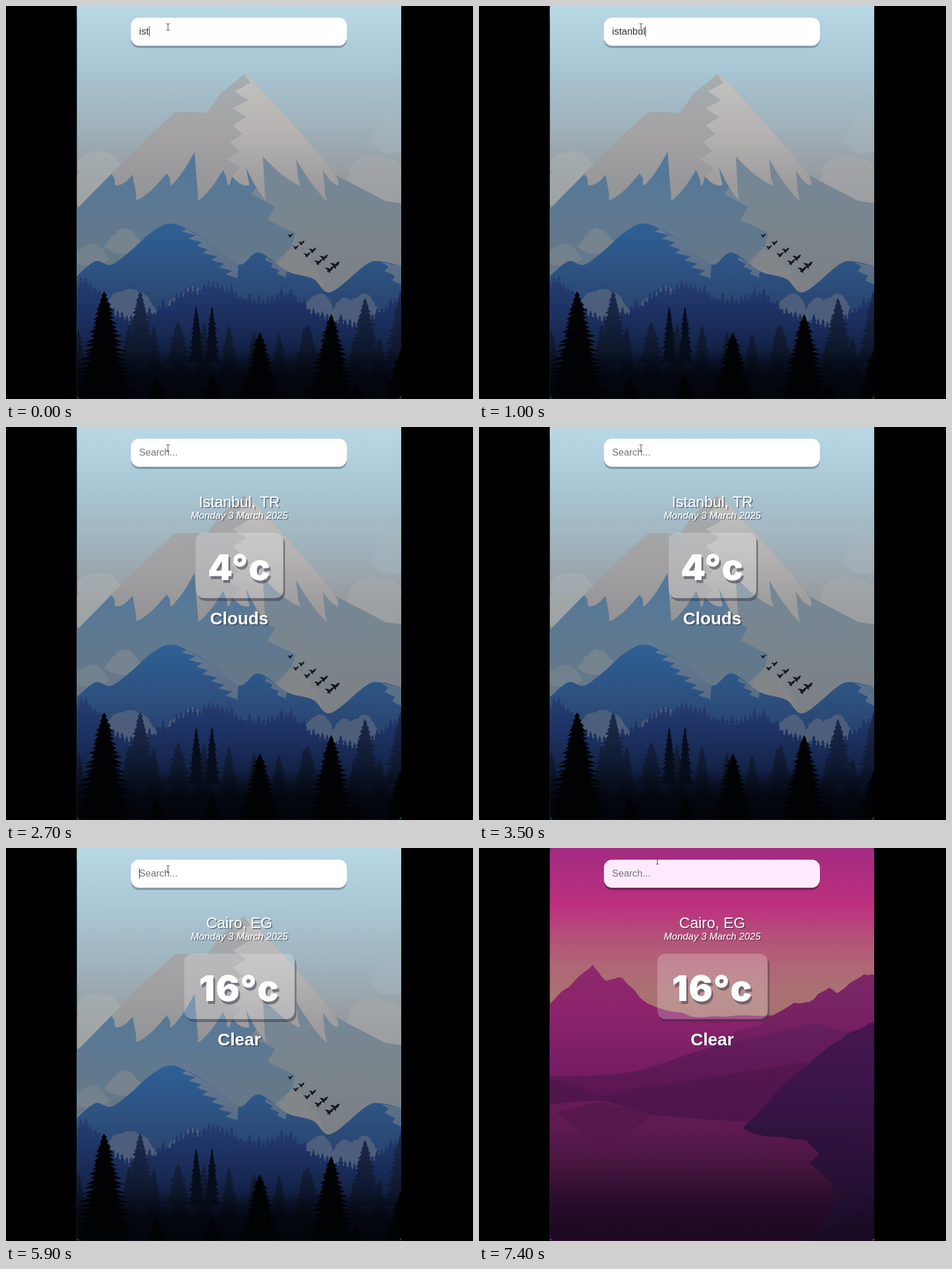
These frames come from a looping animation (800x673 px, 7.5 s). An HTML page:

```html
<!DOCTYPE html>
<html lang="en">
<head>
<meta charset="utf-8">
<title>Weather search</title>
<style>
  html, body { margin: 0; width: 100%; height: 100%; overflow: hidden; background: #000; }
  #stage { position: relative; width: 800px; height: 673px; overflow: hidden; font-family: "Liberation Sans", Arial, sans-serif; }
  #stage > * { position: absolute; }
  svg { left: 0; top: 0; }
  #hot, .warm #cold { display: none; }
  .warm #hot { display: inline; }
  #search {
    left: 214px; top: 20px; width: 370px; height: 48px; border-radius: 14px;
    background: #fff; box-shadow: 0 4px rgba(0, 0, 0, .24);
  }
  .warm #search { background: #feeafc; box-shadow: 0 4px rgba(0, 0, 0, .3); }
  #query { position: absolute; left: 14px; top: 3.2px; font-size: 16.5px; line-height: 40px; color: #313131; white-space: pre; }
  #caret { display: inline-block; width: 1px; height: 17px; margin-right: -1px; vertical-align: -3px; background: #333; }
  #hint { color: #757575; }
  #panel { left: 0; top: 0; width: 799px; height: 673px; color: #fff; text-align: center; }
  #panel div { position: absolute; left: 0; right: 0; line-height: 40px; white-space: pre; }
  #place { top: 108px; font-size: 25.8px; text-shadow: 2px 2px rgba(50, 50, 70, .5); }
  #date { top: 132.2px; font-size: 16.7px; font-style: italic; text-shadow: 2px 2px rgba(50, 50, 70, .5); }
  #panel #box {
    left: 50%; right: auto; top: 181px; height: 112px; transform: translateX(-50%);
    border-radius: 14px; background: rgba(255, 255, 255, .22); box-shadow: 3px 5px rgba(50, 50, 70, .45);
  }
  #temp { top: 219.8px; font: 900 61px Inter, sans-serif; letter-spacing: 1px; text-shadow: 3px 5px rgba(50, 50, 70, .5); }
  #sky { top: 307.8px; font-size: 29.5px; font-weight: 700; text-shadow: 2.4px 2.4px rgba(50, 50, 70, .5); }
  #pointer { left: -4px; top: -7px; }
</style>
</head>
<body>
<div id="stage">
  <svg id="art" width="800" height="673">
    <defs>
      <clipPath id="frame"><rect x="121.5" y="-1" width="555.5" height="673.5" rx="8"/></clipPath>
    </defs>
    <g id="cold">
      <rect x="121.5" width="555.5" height="672" fill="#26495c"/>
      <rect x="121.5" width="555.5" height="20" fill="#dcd6c4"/>
      <g id="peaks" clip-path="url(#frame)"></g>
    </g>
    <g id="hot">
      <rect x="121.5" width="555.5" height="672" fill="#7d3a86"/>
      <g id="lake" clip-path="url(#frame)"></g>
    </g>
  </svg>
  <div id="search"><div id="query"><span id="typed"></span><i id="caret"></i><span id="hint">Search...</span></div></div>
  <div id="panel">
    <div id="place"></div>
    <div id="date">Monday 3 March 2025</div>
    <div id="box"></div>
    <div id="temp"></div>
    <div id="sky"></div>
  </div>
  <svg id="pointer" width="9" height="14">
    <path d="M2 1.5H4L4.5 2 5 1.5H7M4.5 2V12M2 12.5H4L4.5 12 5 12.5H7" fill="none" stroke="#444"/>
  </svg>
</div>
<script>
const $ = id => document.getElementById(id);
let scene, seed = 11, gradients = 0;
const rnd = () => (seed = seed * 16807 % 2147483647) / 2147483647;
const jitter = amp => (rnd() - .5) * 2 * amp;

function add(parent, tag, attrs) {
  const el = document.createElementNS("http://www.w3.org/2000/svg", tag);
  for (const k in attrs) el.setAttribute(k, attrs[k]);
  return parent.appendChild(el);
}

// Point lists
const points = s => s.split(" ").map(p => p.split(",").map(Number));
const mix = (a, b, u) => [a[0] + (b[0] - a[0]) * u, a[1] + (b[1] - a[1]) * u];
const ground = (pts, y = 673) => [...pts, [pts[pts.length - 1][0], y], [pts[0][0], y]];

function rough(pts, amp) {
  return pts.flatMap((p, i) => {
    const next = pts[i + 1];
    if (!next) return [p];
    return [p, ...[.25, .5, .75].map(u => mix(p, next, u).map(v => v + jitter(amp)))];
  });
}

// Catmull-Rom curve through the points.
function smooth(pts) {
  const out = [];
  for (let i = 0; i < pts.length - 1; i++) {
    const a = pts[i - 1] || pts[i], b = pts[i], c = pts[i + 1], d = pts[i + 2] || c;
    for (let u = 0; u < 1; u += .125)
      out.push([0, 1].map(k => b[k] + .5 * u * (c[k] - a[k] + u * (2 * a[k] - 5 * b[k] + 4 * c[k] - d[k]
        + u * (3 * (b[k] - c[k]) + d[k] - a[k])))));
  }
  return [...out, pts[pts.length - 1]];
}

// Jagged border between a lit and a shaded face.
function zigzag([a, b], teeth, amp) {
  const out = [a];
  for (let i = 1; i < teeth * 2; i++) {
    const [x, y] = mix(a, b, i / (teeth * 2));
    out.push([x + (i % 2 ? amp : -amp) * (.6 + .6 * rnd()), y]);
  }
  return [...out, b];
}

// Snow tongues hanging between notches; tips alternate in depth.
function drips(notches, lean) {
  return notches.slice(1).flatMap((n, i) => {
    const from = notches[i], tip = [n[0] + lean, i % 2 ? 332 : 307];
    const belly = mix(from, tip, .5);
    return smooth([from, [belly[0], belly[1] + 5], tip, [n[0] + lean * .7, tip[1] - 12], n]);
  });
}

// Drawing
const outline = pts => "M" + pts.map(p => p.map(n => n.toFixed(1))).join("L") + "Z";

function shade(y1, y2, colors) {
  const id = "g" + gradients++;
  const g = add($("art").querySelector("defs"), "linearGradient",
    { id, gradientUnits: "userSpaceOnUse", x1: 0, x2: 0, y1, y2 });
  colors.forEach((c, i) => add(g, "stop", { offset: i / (colors.length - 1), "stop-color": c }));
  return `url(#${id})`;
}

const shape = (pts, y1, y2, ...colors) => add(scene, "path", { d: outline(pts), fill: shade(y1, y2, colors) });
const backdrop = (y1, y2, ...colors) => shape(points("121,0 678,0 678,673 121,673"), y1, y2, ...colors);

function cloud(x, y, w, h, fill, opacity) {
  const g = add(scene, "g", { fill, opacity });
  for (let u = 0; u <= 1; u += 1 / 14) {
    const lift = Math.sin(Math.PI * u);
    add(g, "circle", { cx: x + w * u, cy: y + h - h * .75 * lift * (.5 + .5 * rnd()), r: h * (.1 + .16 * lift) });
  }
  add(g, "ellipse", { cx: x + w / 2, cy: y + h, rx: w * .5, ry: h * .4 });
}

function conifer(x, top, base, half, rows) {
  const side = s => Array.from({ length: rows }, (_, i) => {
    const u = (i + 1) / rows, w = s * half * Math.pow(u, .75), y = top + (base - top) * u;
    return [[x + w * (.85 + .35 * rnd()), y + jitter(2)], [x + w * (.55 + .15 * rnd()), y + 1]];
  }).flat();
  return outline([[x, top], ...side(1), ...side(-1).reverse()]);
}

function tree(x, top, base, fill, spread = .22, trunk = 10) {
  const h = base - top;
  add(scene, "path", { d: conifer(x, top, base, trunk + h * spread, Math.ceil(h / 8)), fill });
}

function forest(x1, x2, height, size, fill) {
  let d = "";
  for (let x = x1; x < x2; x += size * .3) {
    const y = height(x) + jitter(size * .3);
    d += conifer(x, y, y + size * 1.6, size * .4, 6) + `M${x - size} 673V${y + size}h${size * 2}V673Z`;
  }
  add(scene, "path", { d, fill });
}

const hump = (x, center, width, height) => height * Math.exp(-(((x - center) / width) ** 2));

function drawPeaks() {
  scene = $("peaks");
  backdrop(0, 500, "#b9d8e6", "#a9c7d5", "#a0b3bd", "#96999d", "#83878c", "#6b7484");
  cloud(115, 232, 95, 90, "#abb3b4", .5);
  cloud(575, 240, 115, 90, "#a8abab", .5);
  cloud(630, 182, 60, 50, "#a9b7bf", .4);

  const west = points("180,288 250,219 290,182 345,183 368,150 410,116");
  const east = points("410,116 430,134 468,175 540,257 564,289");
  const spine = zigzag(points("408,117 387,292"), 6, 11);
  shape(ground([[121, 348], ...west, ...east, ...points("650,334 678,338")], 500), 280, 490, "#748797", "#7b858c", "#7b8085");
  shape([[121, 348], [180, 288], [320, 235], ...zigzag(points("412,277 490,411"), 3, 16), [430, 470], [121, 470]],
    260, 470, "#52789c", "#5f7990", "#687885");
  shape([...west, ...spine, ...drips(points("387,292 372,281 323,250 275,287 217,289 180,288"), 8)],
    120, 330, "#a6adaf", "#a3a1a3", "#939496");
  shape([...spine.slice().reverse(), ...east, ...drips(points("387,292 411,277 440,258 497,263 543,282 564,289"), 5).reverse()],
    120, 310, "#c0c1c0", "#b6b3b2", "#9c9b9c");

  cloud(172, 380, 66, 32, "#7f8991", .7);
  cloud(112, 403, 62, 30, "#78858f", .7);
  cloud(452, 416, 85, 60, "#85878a", .8);

  const hills = smooth(points("121,463 153,437 180,443 215,418 250,387 288,373 350,405 398,443 433,422 481,454 526,467 556,490 615,444 640,437 678,446"));
  shape(ground(hills, 560), 374, 530, "#2e6095", "#2d5282", "#28426c");
  const face = (edge, teeth, amp, rest) =>
    shape([...zigzag(points(edge), teeth, amp), ...points(rest)], 374, 480, "#677b92", "#566b84");
  face("296,374 396,472", 8, 9, "398,443 350,405");
  face("437,424 478,470", 4, 5, "481,454");
  face("642,438 678,486", 3, 6, "678,446");

  for (const [x, w] of [[165, 90], [265, 110], [510, 50], [553, 95]]) cloud(x, 470 + x / 30, w, 50, "#53637d", .85);

  const canopy = x => 535 - hump(x, 130, 40, 72) - hump(x, 350, 90, 60) - hump(x, 485, 45, 40) - hump(x, 690, 50, 45);
  forest(121, 678, canopy, 26, shade(465, 673, ["#273c70", "#1e3365", "#162750", "#0b152c", "#040912"]));

  const mid = shade(490, 640, ["#1d2b4d", "#111c35", "#050a15"]);
  for (let x = 124; x < 678; x += 43) tree(x, 555 + jitter(15), 640, mid, .1);
  for (const [x, top] of points("230,489 295,540 517,545 615,500 677,488")) tree(x, top, 610, mid, .18);
  for (const x of [326, 353]) tree(x, 514, 610, "#070d1b", .06, 8);
  shape(points("121,590 678,590 678,673 121,673"), 590, 673, "rgba(3,7,16,0)", "rgba(2,5,12,.75)", "rgba(2,4,9,.95)");
  for (const [x, top] of points("168,489 258,637 353,632 435,559 557,528 600,647 677,588")) tree(x, top, 676, "#010204");

  for (let i = 0; i < 9; i++)
    add(scene, "path", {
      fill: "#15161f", d: "M-1.1-.4L-.3-.35 0-.1 .5-.6 1-.7 .6.1 .2.3 .1.9-.2.55-.6.6-.4.2Z",
      transform: `translate(${487 + 9.6 * i} ${396 + 6.3 * i + (i % 2 ? 11 : -3)}) scale(${4.5 + i * .45})`
    });
}

function drawLake() {
  scene = $("lake");
  backdrop(0, 300, "#a22b82", "#b02d80", "#bc307e", "#b54f7a", "#b06676", "#aa7272", "#a3706d");
  const ridge = (keys, amp, ...fill) => shape(ground(rough(points(keys), amp)), ...fill);
  const slope = (keys, ...fill) => shape(ground(smooth(points(keys))), ...fill);
  ridge("121,268 165,226 195,200 218,228 245,222 288,266 365,289 440,287 505,286 678,330", 2, 200, 400, "#8b2a6d", "#8d236c", "#82206a", "#701b61");
  ridge("390,345 440,314 480,304 540,265 565,264 600,239 615,248 660,216 678,217", 2, 215, 370, "#7b2867", "#772163", "#681b5c");
  slope("121,392 260,384 385,345 500,318 575,301 630,315 678,300", 300, 420, "#66205f", "#601a59", "#5a1652");
  slope("121,399 150,400 207,424 250,415 420,389 560,366", 370, 475, "#54174f", "#4c154a");
  slope("121,440 207,433 300,457 462,470 640,490", 435, 673, "#661b57", "#5d1a50", "#4c1744", "#351034", "#230a26", "#1c0920");
  shape(points("133,453 214,517 240,499 298,458 207,434"), 435, 517, "#57184d", "#53194a");
  const shore = points("678,298 640,314 600,340 532,396 452,479 475,491 560,500 583,524 567,540 604,574 608,612 570,673");
  shape([...rough(shore, 1.5), [678, 673]], 300, 673, "#461650", "#3c154b", "#30123f", "#200d30", "#180b25");
  shape(points("565,538 612,513 655,490 678,497 678,673 570,673 608,612 604,574"), 490, 673, "#33133f", "#241033", "#180c26");
  forest(570, 678, x => 665 - (x - 565) * .6, 28, shade(600, 673, ["#1e0e2d", "#160b22"]));
}

// Letters appear every gap ms from the given count; sending clears the field and shows the report.
const searches = [
  { word: "istanbul", from: 0, given: 3, gap: 200, sent: 2200, place: "Istanbul, TR", temp: "4°c", sky: "Clouds", width: 150 },
  { word: "cairo", from: 4400, given: 1, gap: 130, sent: 5500, place: "Cairo, EG", temp: "16°c", sky: "Clear", width: 189 }
];

function render(t) {
  const { word, from, given, gap, sent } = searches.filter(s => t >= s.from).pop();
  const keys = Math.min(Math.floor((t - from) / gap), word.length - given);
  const text = t < sent ? word.slice(0, given + keys) : "";
  const lastAction = t < sent ? from + keys * gap : sent;
  $("typed").textContent = text;
  $("hint").style.display = text ? "none" : "inline";
  $("caret").style.visibility = t - lastAction < 500 ? "visible" : "hidden";

  const report = searches.filter(s => t >= s.sent).pop();
  $("panel").style.display = report ? "block" : "none";
  if (report) {
    for (const id of ["place", "temp", "sky"]) $(id).textContent = report[id];
    $("box").style.width = report.width + "px";
  }
  $("stage").classList.toggle("warm", t >= 6000);

  const move = Math.max(0, (Math.floor(t / 100) - 72) / 2);
  $("pointer").style.transform = `translate(${277 + 28 * move}px, ${36 - 14 * move}px)`;
}

drawPeaks();
drawLake();
const start = performance.now();
function tick() {
  render((performance.now() - start) % 7500);
  requestAnimationFrame(tick);
}
tick();
</script>
</body>
</html>
```
